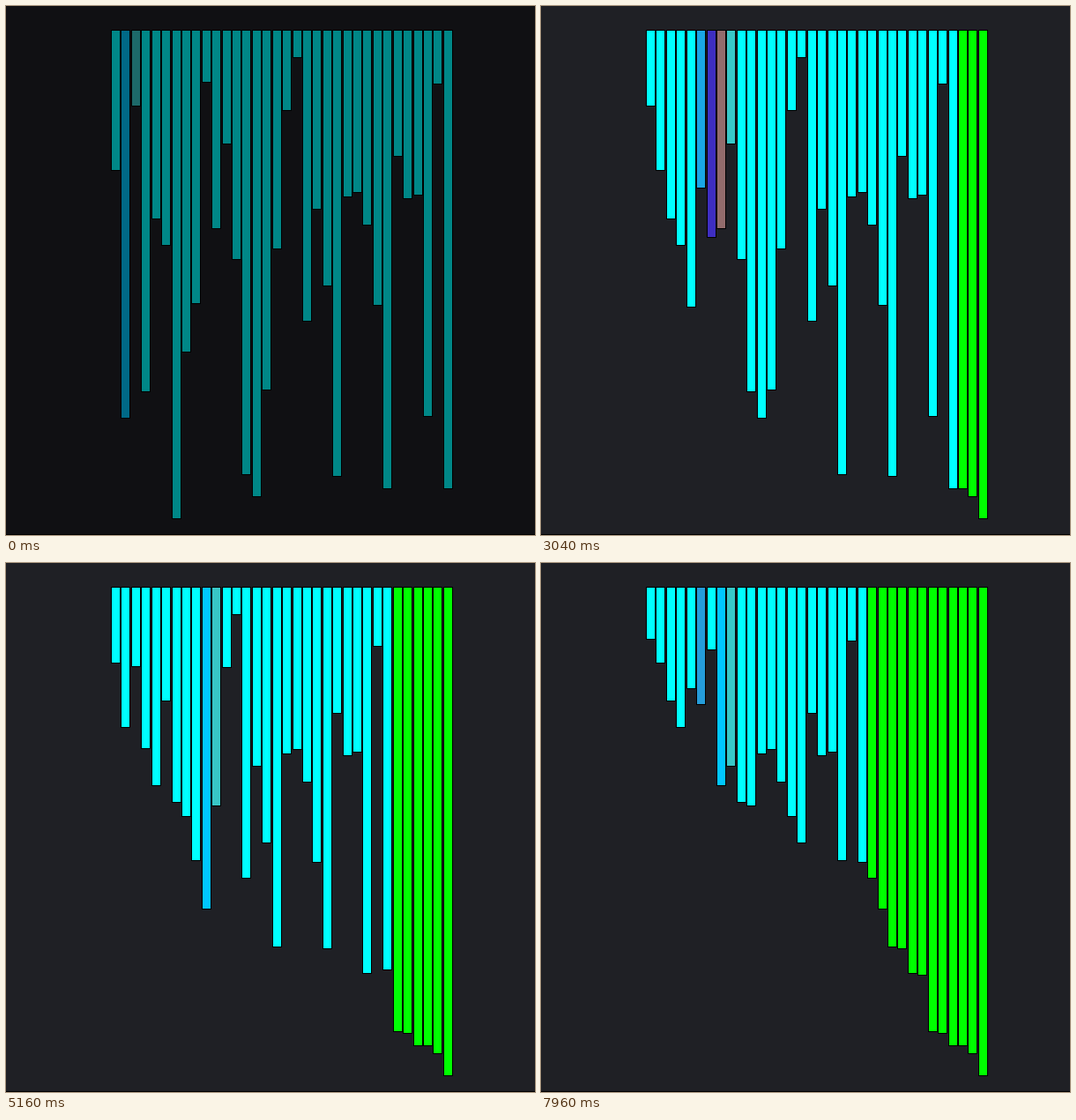
Animation of 600 by 600 pixels, one loop 8000 ms. Source, as a matplotlib script:

```python
import numpy as np
import matplotlib.pyplot as plt
from matplotlib.animation import FuncAnimation
from matplotlib.patches import Rectangle

SIZE, FRAMES, INTERVAL = 600, 200, 40
BACK = "#1f2025"
CYAN, BLUE, RED, GREEN = (np.array(c, float) for c in
                          [(0, 1, 1), (0, 0, 1), (1, 0, 0), (0, 1, 0)])
TOP, LEFT, PITCH, WIDTH = 28, 119, 11.42, 9

BOTTOMS = [186, 467, 113, 437, 241, 271, 581, 392, 337, 86, 252, 156,
           287, 531, 556, 435, 275, 118, 58, 357, 230, 317, 533, 216,
           211, 248, 339, 547, 170, 218, 214, 465, 88, 547]
N = len(BOTTOMS)

# Swap number -> screen refresh (60 per second) at which it starts
SWAPS = [0, 28, 61, 106, 142, 185, 218, 228]
REFRESH = [-0.99, 60.3, 133.3, 230.3, 309.0, 404.3, 476.3, 498.1]
EASE_TICKS = 6  # 0.1 s


def ease(age):
    """CSS 'ease' curve, age in screen refreshes."""
    s = np.linspace(0, 1, 400)
    x = 0.75 * s * (1 - s) ** 2 + 0.75 * s ** 2 * (1 - s) + s ** 3
    y = 0.3 * s * (1 - s) ** 2 + 3 * s ** 2 * (1 - s) + s ** 3
    return np.interp(age / EASE_TICKS, x, y)


EASE = [ease(k) for k in range(EASE_TICKS + 1)]


class Tween:
    def __init__(self, value):
        self.start = self.end = np.array(value, float)
        self.born, self.lead = -100, 0

    def at(self, tick):
        age = min(max(tick - self.born, self.lead), EASE_TICKS)
        return self.start + (self.end - self.start) * EASE[age]

    def to(self, value, tick, ahead=0, lead=0):
        self.start, self.end = self.at(tick), np.array(value, float)
        self.born, self.lead = tick - ahead, lead


def bubble(values):
    """Every swap as (position, values after it, last unsorted position)."""
    a, steps = list(values), []
    for last in range(N - 1, 0, -1):
        for i in range(last):
            if a[i] > a[i + 1]:
                a[i], a[i + 1] = a[i + 1], a[i]
                steps.append((i, list(a), last))
    return steps


def recolor(tween, goal, tick, ahead):
    if np.array_equal(goal, tween.end):
        return
    fresh = np.allclose(tween.at(tick), CYAN, atol=0.03)
    if goal is CYAN and np.allclose(tween.start, CYAN, atol=0.03):
        tween.start = tween.end = CYAN
    else:
        tween.to(goal, tick, ahead, 1 if fresh else 0)


def simulate(ticks):
    steps = bubble(BOTTOMS)
    heights = [Tween(b) for b in BOTTOMS]
    colors = [Tween(CYAN) for _ in range(N)]
    states, n = [], 0
    for tick in range(-1, ticks):
        while int(np.floor(np.interp(n, SWAPS, REFRESH))) <= tick:
            nxt, _, last = steps[n]
            prev = -1
            if n:
                prev, values, _ = steps[n - 1]
                for k in (prev, prev + 1):
                    heights[k].to(values[k], tick)
            for k in range(N):
                goal = (GREEN if k > last else BLUE if k == nxt
                        else RED if k == nxt + 1 else CYAN)
                ahead = int(k == prev and nxt != prev + 1)
                recolor(colors[k], goal, tick, ahead)
            n += 1
        states.append(([float(h.at(tick)) for h in heights],
                       [np.clip(c.at(tick), 0, 1) for c in colors]))
    return states[1:]


STATES = simulate(FRAMES * 12 // 5)

fig = plt.figure(figsize=(6, 6), dpi=100, facecolor=BACK)
ax = fig.add_axes([0, 0, 1, 1])
ax.set_xlim(0, SIZE)
ax.set_ylim(SIZE, 0)
ax.axis("off")


def box(x, y, w, h, color, z):
    return ax.add_patch(Rectangle((x, y), w, h, facecolor=color, lw=0,
                                  antialiased=False, zorder=z))


box(0, SIZE - 1, SIZE, 1, "black", 1)
frames, fills = [], []
for k in range(N):
    x = round(LEFT + PITCH * k)
    frames.append(box(x, TOP - 1, WIDTH + 2, 1, "black", 2))
    fills.append(box(x + 1, TOP, WIDTH, 1, CYAN, 3))
shade = box(0, 0, SIZE, SIZE, "black", 4)


def draw(frame):
    heights, colors = STATES[frame * 12 // 5]
    for rim, fill, h, c in zip(frames, fills, heights, colors):
        length = round(h) - TOP
        rim.set_height(length + 2)
        fill.set_height(length)
        fill.set_facecolor(tuple(c))
    shade.set_alpha(0.47 * max(0, 1 - frame / 21))
    return [*frames, *fills, shade]


anim = FuncAnimation(fig, draw, frames=FRAMES, interval=INTERVAL,
                     repeat=True, repeat_delay=0)
plt.show()
```
